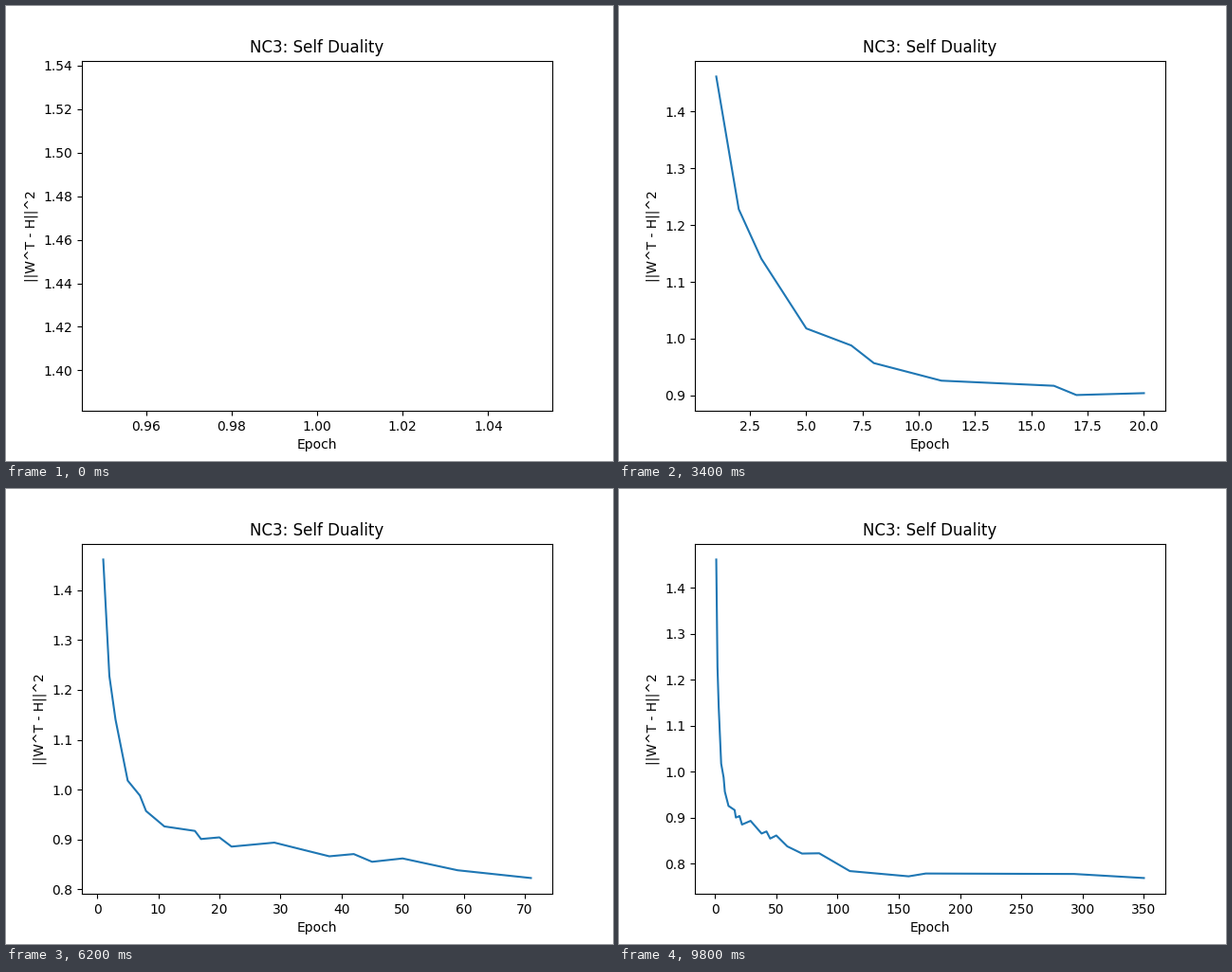
Animation of 640 by 480 pixels, one loop 10000 ms. Source, as a matplotlib script:

```python
import numpy as np
import matplotlib.pyplot as plt
from matplotlib.animation import FuncAnimation

# Logged epochs grow geometrically; whole epochs are kept once each
epochs = np.unique(np.geomspace(1.0025, 350, 67).round())

# Turning points of the curve: (epoch, distance)
turns = [
    (1, 1.4618), (2, 1.228), (3, 1.141), (5, 1.018), (7, .988), (8, .957),
    (11, .926), (16, .917), (17, .9007), (20, .904), (22, .8855),
    (29, .8935), (38, .866), (42, .8705), (45, .855), (50, .8617),
    (59, .838), (71, .8224), (85, .823), (110, .7843), (158, .7729),
    (172, .779), (293, .778), (350, .7692),
]
distance = np.interp(epochs, *zip(*turns))

fig, ax = plt.subplots(figsize=(6.4, 4.8), dpi=100)


def draw(i):
    ax.clear()
    line, = ax.plot(epochs[:i + 1], distance[:i + 1])
    ax.set_title("NC3: Self Duality")
    ax.set_xlabel("Epoch")
    ax.set_ylabel("||W^T - H||^2")
    return line,


anim = FuncAnimation(fig, draw, frames=len(epochs), interval=200,
                     init_func=lambda: draw(0), repeat=True, repeat_delay=0)
plt.show()
```
